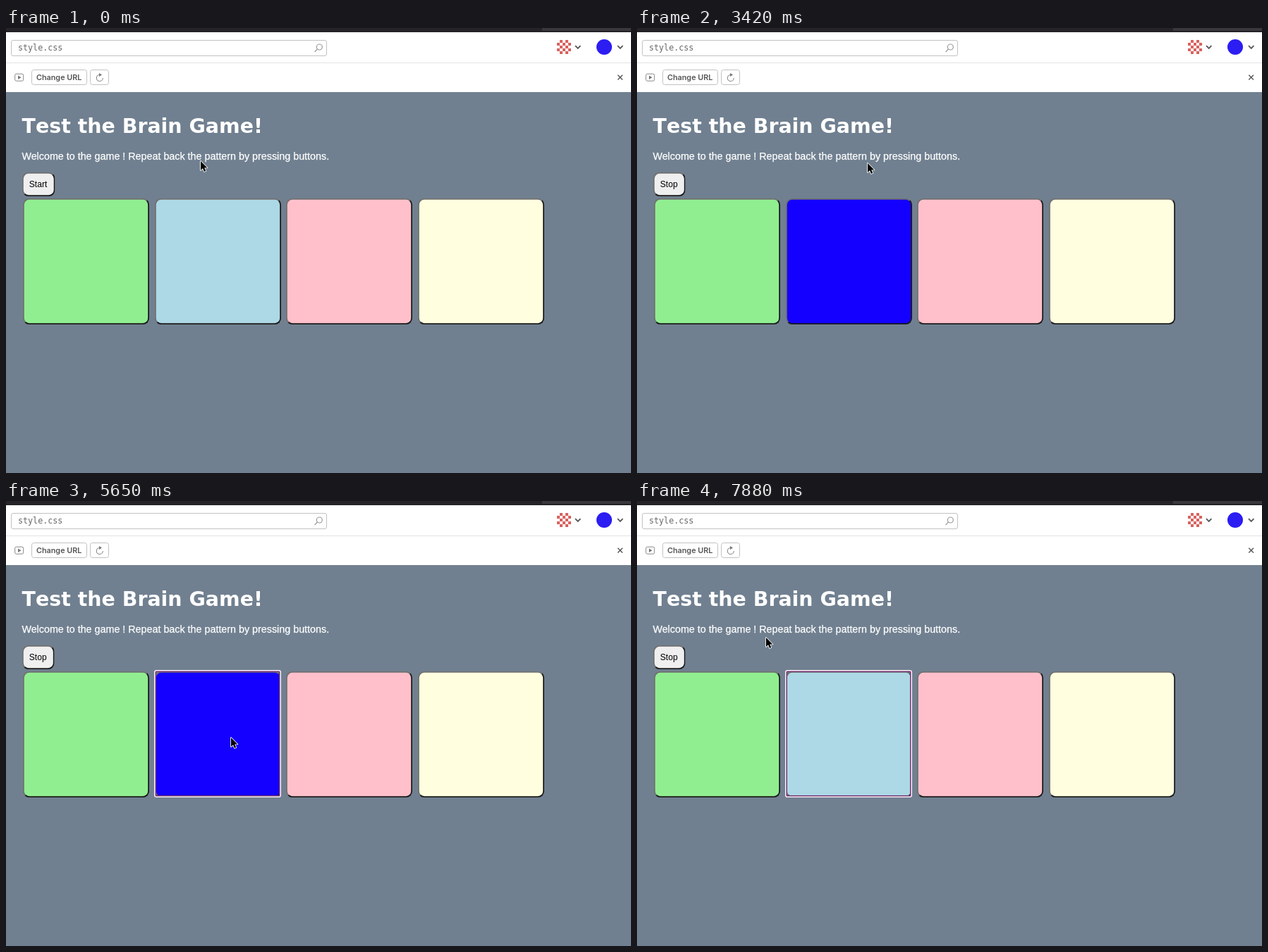
These frames come from a looping animation (886x632 px, 8 s). An HTML page:

```html
<!DOCTYPE html>
<html lang="en">
<head>
<meta charset="utf-8">
<title>Test the Brain Game!</title>
<style>
  html, body { margin: 0; width: 100%; height: 100%; overflow: hidden; background: #708090; }
  #stage { position: absolute; left: 0; top: 0; width: 886px; height: 632px; overflow: hidden; }
  #stage > * { position: absolute; box-sizing: border-box; }
  svg { left: 0; top: 0; }
  #avatar {
    left: 781px; top: 17px; width: 20px; height: 20px;
    background: repeating-conic-gradient(#d8625f 0 25%, #fff 0 50%) 0 0 / 8px 8px;
  }
  .button {
    border: 2px solid; border-radius: 10px; transform: scale(.895); transform-origin: 0 0;
    border-color: #707070 #1a1a1a #1a1a1a #707070;
  }
  .pad { top: 241.5px; width: 200px; height: 200px; }
  #toggle { left: 22.6px; top: 205px; height: 38px; background: #efefef; }
  .ring {
    border-radius: 3px; visibility: hidden;
    box-shadow: inset 0 0 0 1.5px #fdf3fa, inset 0 0 0 3px #70336f;
  }
  #toggleRing { left: 21px; top: 203px; width: 49px; height: 37px; border-radius: 8px; }
  #padRing { left: 210px; top: 240px; width: 180px; height: 181px; }
  text { white-space: pre; }
  .sans { font-family: "Liberation Sans", Arial, sans-serif; }
</style>
</head>
<body>
<div id="stage">
  <svg width="886" height="632" viewBox="0 0 886 632" fill="none">
    <path fill="#fff" d="M0 6H886V91H0z"/>
    <path fill="#252327" d="M0 0H886V6H0z"/>
    <path fill="#39373b" d="M760 0H886V4H760z"/>
    <path stroke="#e2e2e2" d="M0 49.5H886"/>

    <g stroke="#c2c2c2">
      <rect x="7.5" y="17.5" width="447" height="22" rx="2.5"/>
      <rect x="36.5" y="59.5" width="78" height="21" rx="3"/>
      <rect x="119.5" y="59.5" width="26" height="21" rx="3"/>
    </g>
    <text x="17" y="32" fill="#666" font-size="11.7" font-family="'DejaVu Sans Mono', monospace">style.css</text>
    <g stroke="#999" stroke-width="1.2">
      <circle cx="444.3" cy="27" r="4"/>
      <path d="M441.4 30L437.6 34"/>
    </g>

    <circle cx="848" cy="27" r="11" fill="#2c1df2"/>
    <g stroke="#555" stroke-width="1.8">
      <path d="M807 25.2L810.7 28.9 814.4 25.2"/>
      <path d="M867 25.2L870.7 28.9 874.4 25.2"/>
      <path stroke-width="1.4" d="M867.3 66.7L874 73.4M874 66.7L867.3 73.4"/>
    </g>

    <rect x="12.7" y="65.2" width="12" height="10" rx="2" stroke="#888"/>
    <path fill="#777" d="M17 67.5L21.6 70.2 17 73z"/>
    <text x="43" y="73.8" fill="#555" font-size="10.8" font-weight="600" font-family="Inter, sans-serif">Change URL</text>
    <path stroke="#888" stroke-width="1.1" d="M132.5 66.5A4.5 4.5 0 1 0 137.3 71"/>
    <path fill="#777" d="M132 64L136 66.5 132 69z"/>

    <g fill="#fff">
      <text x="22.6" y="149" font-size="28.45" font-weight="700" font-family="'DejaVu Sans', Verdana, sans-serif" style="font-kerning: none">Test the Brain Game!</text>
      <text class="sans" x="22.4" y="186.5" font-size="14.32" stroke="#fff" stroke-width=".25">Welcome to the game ! Repeat back the pattern by pressing buttons.</text>
    </g>
  </svg>

  <div id="avatar"></div>
  <div id="toggle" class="button"></div>
  <div id="toggleRing" class="ring"></div>
  <div id="padRing" class="ring"></div>

  <svg width="886" height="632">
    <text id="label" class="sans" x="32.8" y="226" font-size="12.1"></text>
    <path id="cursor" stroke="#fff" stroke-width="1.7" stroke-linejoin="round" paint-order="stroke"
      d="M0 0V13L3 10.3 5 15 7.2 14 5.2 9.5H9.3Z"/>
  </svg>
</div>
<script>
  const LOOP = 8000, TICK = 148.7;
  const $ = id => document.getElementById(id);

  const swing = s => (1 - Math.cos(Math.PI * s)) / 2;
  const settle = s => 1 - (1 - s) ** 3;

  // Pointer sweeps: quadratic curves from one resting place to the next.
  const sweeps = [
    { start: 0, end: 1490, from: [276, 189], via: [155, 162], to: [51, 222], ease: swing },
    { start: 2370, end: 3420, from: [51, 222], via: [200, 156], to: [327, 192], ease: swing },
    { start: 4470, end: 5060, from: [327, 192], via: [330, 264], to: [319, 336], ease: swing },
    { start: 5800, end: 6240, from: [319, 336], via: [370, 240], to: [430, 199], ease: swing },
    { start: 6540, end: 7440, from: [430, 199], via: [306, 180], to: [183, 194], ease: settle }
  ];
  const litSpans = [[3270, 4320], [5650, 5800], [6840, 7880]];
  const pressed = 1940, started = 2230, focused = 5650;

  function pointerAt(t) {
    const { start, end, from, via, to, ease } = sweeps.findLast(sweep => sweep.start <= t);
    const s = ease(Math.min(1, (t - start) / (end - start)));
    return from.map((a, i) => (1 - s) ** 2 * a + 2 * s * (1 - s) * via[i] + s * s * to[i]);
  }

  const pads = ["#90ee90", "#add8e6", "#ffc0cb", "#ffffe0"].map((color, i) => {
    const pad = document.createElement("div");
    pad.className = "button pad";
    pad.style.left = 24 + 186.6 * i + "px";
    pad.style.background = color;
    $("stage").insertBefore(pad, $("toggleRing"));
    return pad;
  });

  const show = (id, on) => { $(id).style.visibility = on ? "visible" : "hidden"; };

  function draw(t) {
    const held = Math.floor((t + 10) / TICK) * TICK;
    const [x, y] = pointerAt(held).map(Math.round);
    $("cursor").setAttribute("transform", `translate(${x} ${y})`);

    const running = t >= started;
    $("label").textContent = running ? "Stop" : "Start";
    $("toggle").style.width = running ? "51px" : "52px";
    show("toggleRing", t >= pressed && !running);
    show("padRing", t >= focused);

    const lit = litSpans.some(([from, to]) => t >= from && t < to);
    pads[1].style.background = lit ? "#1400ff" : "#add8e6";
  }

  const origin = performance.now();
  function tick() {
    draw((performance.now() - origin) % LOOP);
    requestAnimationFrame(tick);
  }
  tick();
</script>
</body>
</html>
```
